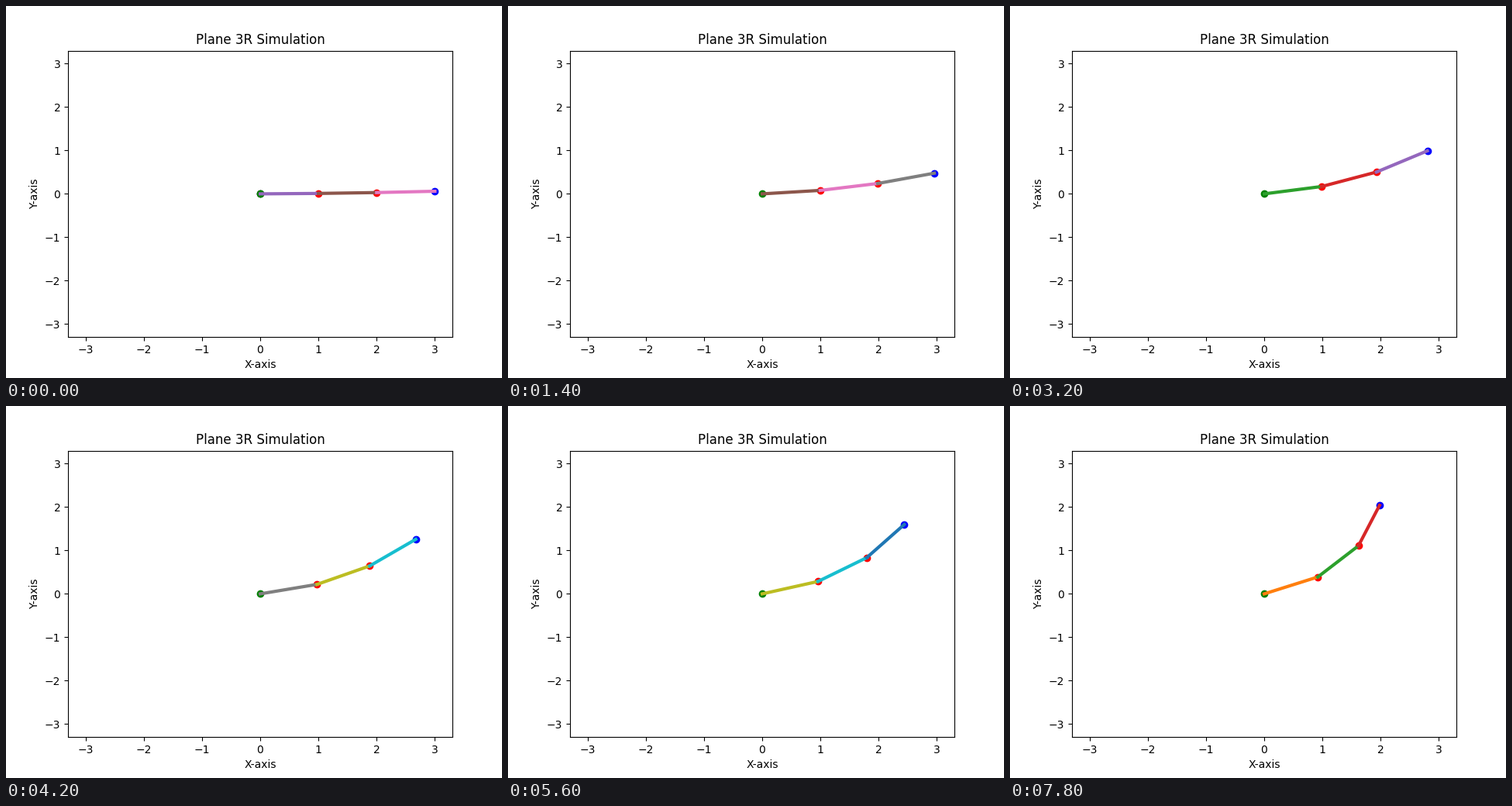
Write a matplotlib script that moves like this. It is 640 px wide and 480 px high and loops after 8 s.

```python
import numpy as np
import matplotlib.pyplot as plt
from matplotlib.animation import FuncAnimation

FRAMES = 40
INTERVAL = 200
STEP = 0.01     # joint angle gained per frame, in radians
LIMIT = 3.3

fig, ax = plt.subplots(figsize=(6.4, 4.8), dpi=100)
ax.set_xlim(-LIMIT, LIMIT)
ax.set_ylim(-LIMIT, LIMIT)
ax.set_title("Plane 3R Simulation")
ax.set_xlabel("X-axis")
ax.set_ylabel("Y-axis")

start_mark, = ax.plot([0], [0], "ko")
joints = [ax.plot([0], [0], style)[0] for style in ("go", "ro", "ro", "bo")]
links = [ax.plot([], [], lw=3)[0] for _ in range(3)]


def arm(theta):
    """Joint positions of three unit links, each bent by theta."""
    angles = theta * np.arange(1, 4)
    x = np.concatenate(([0], np.cos(angles).cumsum()))
    y = np.concatenate(([0], np.sin(angles).cumsum()))
    return x, y


def update(k):
    x, y = arm(STEP * (k + 1))
    start_mark.set_visible(k == 0)
    for i, joint in enumerate(joints):
        joint.set_data([x[i]], [y[i]])
    # the colour cycle moves on by three links every frame
    for i, link in enumerate(links):
        link.set_data(x[i:i + 2], y[i:i + 2])
        link.set_color(f"C{(4 + 3 * k + i) % 10}")
    return [start_mark, *joints, *links]


anim = FuncAnimation(fig, update, frames=FRAMES, interval=INTERVAL,
                     repeat=True, repeat_delay=0)
plt.show()
```
